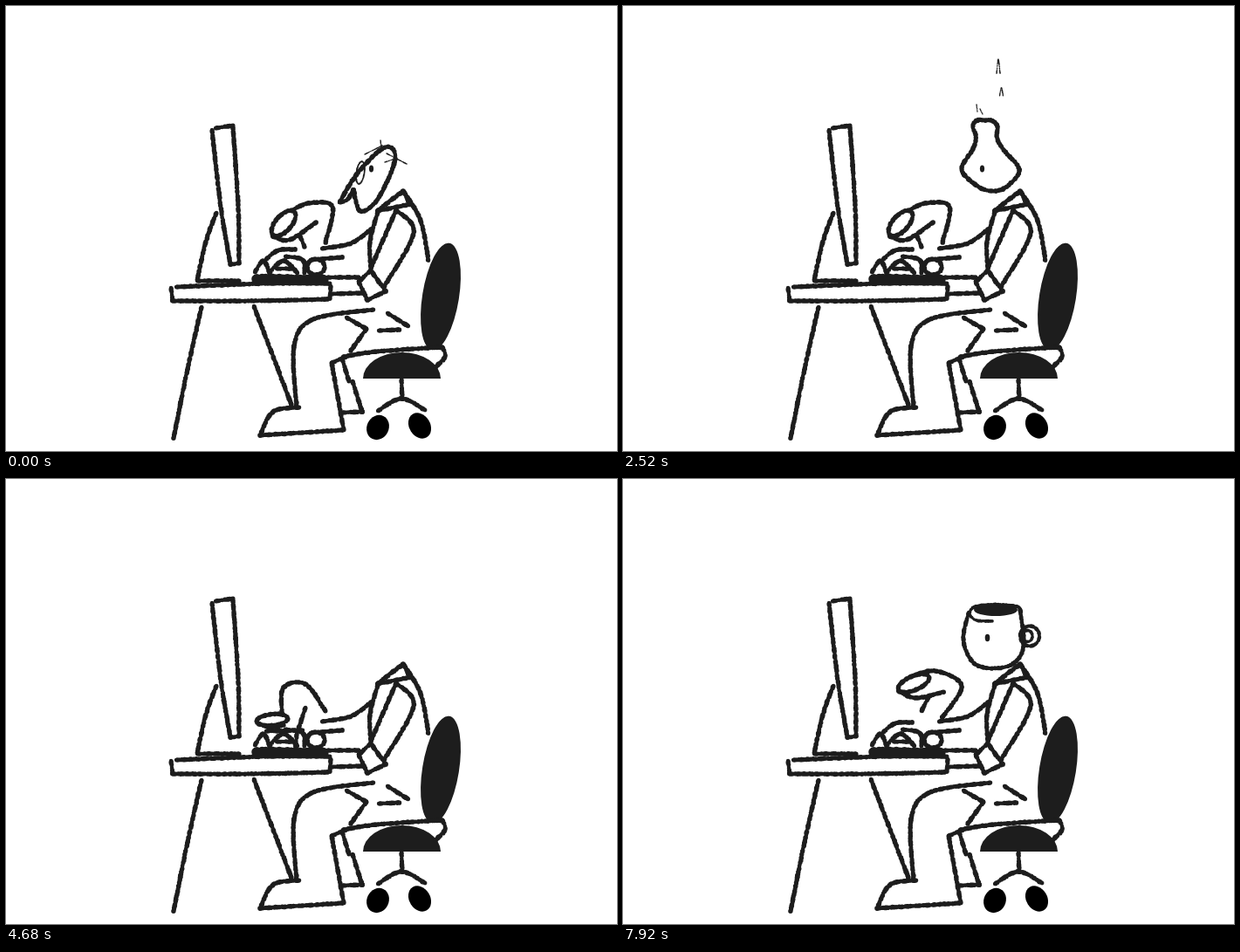
Write an HTML page with a canvas that moves like this. It is 700 by 510 pixels and loops after 8000 ms.

```html
<!DOCTYPE html>
<html lang="en">
<head>
<meta charset="utf-8">
<title>Desk worker</title>
<style>
html, body { margin: 0; width: 100%; height: 100%; overflow: hidden; background: #fff; }
canvas { display: block; }
</style>
</head>
<body>
<canvas id="stage" width="700" height="510"></canvas>
<script>
const LOOP = 8000, INK = '#1d1d1d', TAU = Math.PI * 2;
const stage = document.getElementById('stage');
let ctx = stage.getContext('2d');

const mix = (a, b, p) => a + (b - a) * p;
const ramp = (t, from, span) => Math.max(0, Math.min(1, (t - from) / span));
const points = s => s.trim().split(/\s+/).map(q => q.split(',').map(Number));
const noise = n => {
  const v = Math.sin(n * 127.1 + 3.7) * 43758.5;
  return v - Math.floor(v) - 0.5;
};

function spline(a, b, c, d, t) {
  const bend = 2 * a - 5 * b + 4 * c - d;
  const twist = 3 * (b - c) + d - a;
  return b + 0.5 * t * (c - a + t * (bend + t * twist));
}

// Smooth curve through the points, sampled about every 1.2 px
function curve(pts, closed) {
  const n = pts.length, out = [];
  const at = i => pts[closed ? (i + n) % n : Math.max(0, Math.min(n - 1, i))];
  for (let i = 0; i < (closed ? n : n - 1); i++) {
    const [a, b, c, d] = [at(i - 1), at(i), at(i + 1), at(i + 2)];
    const steps = Math.max(2, Math.ceil(Math.hypot(c[0] - b[0], c[1] - b[1]) / 1.2));
    for (let k = 0; k < steps; k++) {
      out.push([0, 1].map(j => spline(a[j], b[j], c[j], d[j], k / steps)));
    }
  }
  if (!closed) out.push(pts[n - 1]);
  return out;
}

// Rough crayon line
function ink(pts, w = 5, closed = false) {
  ctx.fillStyle = INK;
  ctx.beginPath();
  curve(pts, closed).forEach(([x, y], i) => {
    const r = w / 2 + noise(i) * w * 0.16;
    const px = x + noise(i + 500) * w * 0.1;
    const py = y + noise(i + 900) * w * 0.1;
    ctx.moveTo(px + r, py);
    ctx.arc(px, py, r, 0, TAU);
  });
  ctx.fill();
}

const pen = (s, w) => s.split('/').forEach(part => ink(points(part), w));

function ring(x, y, rx, ry, turn = 0, w = 5) {
  const cos = Math.cos(turn), sin = Math.sin(turn);
  ink(Array.from({ length: 12 }, (_, i) => {
    const u = rx * Math.cos(i * TAU / 12), v = ry * Math.sin(i * TAU / 12);
    return [x + u * cos - v * sin, y + u * sin + v * cos];
  }), w, true);
}

function oval(x, y, rx, ry, turn = 0, color = INK, from = 0) {
  ctx.fillStyle = color;
  ctx.beginPath();
  ctx.ellipse(x, y, rx, ry, turn, from, TAU);
  ctx.fill();
}

function drawDesk() {
  pen('236,142 246,230 257,296 / 257,296 267,295 / 267,295 266,230 260,139 / 240,140 260,137');
  pen('241,237 229,270 219,314 / 219,315 267,315');
  pen('195,322 300,318 371,318 / 189,323 191,338 / 191,338 280,338 368,336 / 372,321 371,335');
  pen('224,345 208,416 192,495 / 284,344 327,457');
  pen('286,313 363,314', 11);
}

function drawChair() {
  oval(498, 333, 21, 62, 0.16);
  oval(453.5, 427, 44.5, 30, 0, INK, Math.PI);
  pen('386,402 425,396 500,391 / 500,391 503,402 492,414');
  pen('453,428 454,450 / 426,464 453,450 480,463');
  oval(426, 483, 12.5, 14.5, 0.45, '#000');
  oval(474, 481, 12, 15.5, -0.55, '#000');
}

function drawBody() {
  pen('421,348 352,359 330,390 333,460 / 336,460 306,465 291,492 / 291,492 387,486 / 387,486 373,409 / 373,409 392,401');
  pen('385,404 393,430 / 397,430 408,465 / 385,466 408,465');
  pen('390,357 413,370 / 413,370 395,395 / 437,352 461,367 / 427,372 451,371');
  pen('456,213 475,246 484,292 / 425,235 455,212 / 455,212 462,226 / 425,235 464,227 / 426,236 417,270 418,300');
  pen('447,234 467,260 433,322 / 447,234 418,300');
  pen('418,303 404,316 / 404,316 414,337 / 414,337 435,327 / 435,327 418,303');
  pen('371,330 407,329 / 368,311 404,311 / 362,278 395,272 418,256');
  pen('285,305 295,292 302,306 / 302,305 318,292 334,306 / 310,301 326,301 / 320,287 340,291 342,306 / 349,291 385,288');
  ring(355, 299, 10, 9);
}

// Finger oval (x, y, rx, ry, turn), then back of hand, palm and thumb
const hand = (fingers, ...lines) => ({ fingers, lines: lines.map(points) });
const REST = hand([318, 249, 18, 9, -0.83], '326,235 347,226 374,230 366,271', '305,264 325,268 355,248', '337,264 342,276');
const HIGH = hand([333, 234, 19, 8, -0.4], '328,227 358,220 388,237 366,273', '315,243 336,251 367,244', '350,250 342,266');
const DOWN = hand([305, 276, 18, 6.5, -0.1], '316,268 318,239 343,235 366,266', '289,280 303,285 318,282', '343,262 335,287');

function drawHand(t) {
  const pressed = t >= 1400 && t < 1800 || t >= 4560 && t < 4920;
  const [a, b] = pressed ? [HIGH, DOWN] : [REST, HIGH];
  let p;
  if (pressed) p = ramp(t, t < 1800 ? 1360 : 4520, 160);
  else if (t < 1400) p = ramp(t, 880, 160);
  else p = ramp(t, t < 4920 ? 3160 : 7160, 600);
  ring(...a.fingers.map((v, i) => mix(v, b.fingers[i], p)));
  a.lines.forEach((line, i) => ink(line.map((q, k) => q.map((v, j) => mix(v, b.lines[i][k][j], p)))));
  if (pressed && p === 1) pen('298,289 340,288 / 333,292 332,307');
  else pen('298,290 312,280 331,279');
}

function drawBird(t) {
  pen('382,225 404,190 434,162 446,175 426,221 406,235 398,210 / 382,225 391,222 398,211');
  pen('429,154 430,162 / 411,170 431,160 / 436,169 459,181 / 434,179 443,176', 1.6);
  ring(406, 191, 4.5, 13, 0.15, 2);
  if (t >= 600 && t < 920) pen('416,187 421,187', 2);
  else oval(418.5, 186.5, 2.6, 4);
}

// Flask outline: half widths by relative height, mirrored around a leaning axis
function drawFlask(t) {
  const open = ramp(t, 2520, 840), swell = ramp(t, 3480, 720);
  const height = t < 2520 ? mix(60, 81, ramp(t, 1800, 720)) : mix(81, 123, open);
  const lip = mix(14, 20, open), lean = mix(-10, 3, open);
  const side = [
    [mix(16, 24, open), 0.06], [33 + 11 * swell, 0.3], [mix(18, 23, open), 0.58],
    [12 + 4 * swell, 0.75], [lip, 0.92], [lip - 6, 1]
  ];
  const place = ([w, u]) => [424 + lean * u + w, 212 - height * u];
  const left = side.map(([w, u]) => place([-w, u]));
  const right = side.map(place).reverse();
  ink([place([0, 0]), ...left, place([0, 1 - 0.16 * open]), ...right], 5, true);
  oval(411.5, 186.5, 2.6, 4);
}

function drawSteam(t) {
  const phase = (t - 1800) / 840 % 1;
  if (t >= 2640) {
    if (phase > 0.6) ring(433, 113 - 58 * phase, 3, 7, -0.2, 1.5);
    return;
  }
  for (const p of [phase, (phase + 0.5) % 1]) {
    const x = 436 - 7 * p, y = 119 - 58 * p, h = 2 + 7 * p;
    ink([[x - 2, y + h], [x, y - h], [x + 2, y + h]], 1.6);
  }
  pen('405,113 406,121 / 409,118 412,124', 1.5);
}

// Flecks flying up and out
function drawBurst(p) {
  for (let i = 0; i < 9; i++) {
    const a = -Math.PI / 2 + (i - 4) * 0.2;
    const r = mix(50, 130 + 30 * noise(i), p);
    ring(430 + r * 0.5 * Math.cos(a), 160 + r * Math.sin(a), 2, 5, a + Math.PI / 2, 1.6);
  }
}

function drawBoiling(t) {
  const q = 1800 + Math.floor((t - 1800) / 120) * 120;
  if (q >= 4320) return drawBurst(ramp(q, 4200, 360));
  drawFlask(q);
  if (q >= 2040) drawSteam(q);
}

// Stays tipped with a small tremble, then rocks once a second
function mugTilt(t) {
  const turn = (t - 6420) / 1000 * TAU;
  return t < 6420 ? 9 + Math.cos(2 * turn) : 5 + 5 * Math.cos(turn);
}

function drawMug(t) {
  const q = 4920 + Math.floor((t - 4920) / 125) * 125;
  ctx.save();
  ctx.translate(425, 185);
  ctx.rotate(mugTilt(q) * Math.PI / 180);
  ctx.translate(-425, -185);
  pen('396,153 390,185 402,211 425,217 448,211 459,190 455,150', 4.7);
  pen('396,156 402,147 425,144 451,146 456,152', 4);
  oval(427, 150, 25, 7);
  pen('397,156 405,162 423,163', 3.6);
  ring(466, 180, 11, 11.5, 0, 4.2);
  ring(463.5, 180, 5.5, 6.5, 0, 3.6);
  ctx.restore();
  oval(417.5, 182, 2.8, 4.2);
}

// The still parts are drawn once
const still = document.createElement('canvas');
still.width = 700;
still.height = 510;
const live = ctx;
ctx = still.getContext('2d');
drawDesk();
drawChair();
drawBody();
ctx = live;

function draw(now) {
  const t = Math.floor(now % LOOP / 40) * 40;
  ctx.fillStyle = '#fff';
  ctx.fillRect(0, 0, 700, 510);
  ctx.drawImage(still, 0, 0);
  drawHand(t);
  if (t < 1800) drawBird(t);
  else if (t < 4680) drawBoiling(t);
  else if (t >= 4920) drawMug(t);
}

const start = performance.now();
function tick() {
  draw(performance.now() - start);
  requestAnimationFrame(tick);
}
tick();
</script>
</body>
</html>
```
